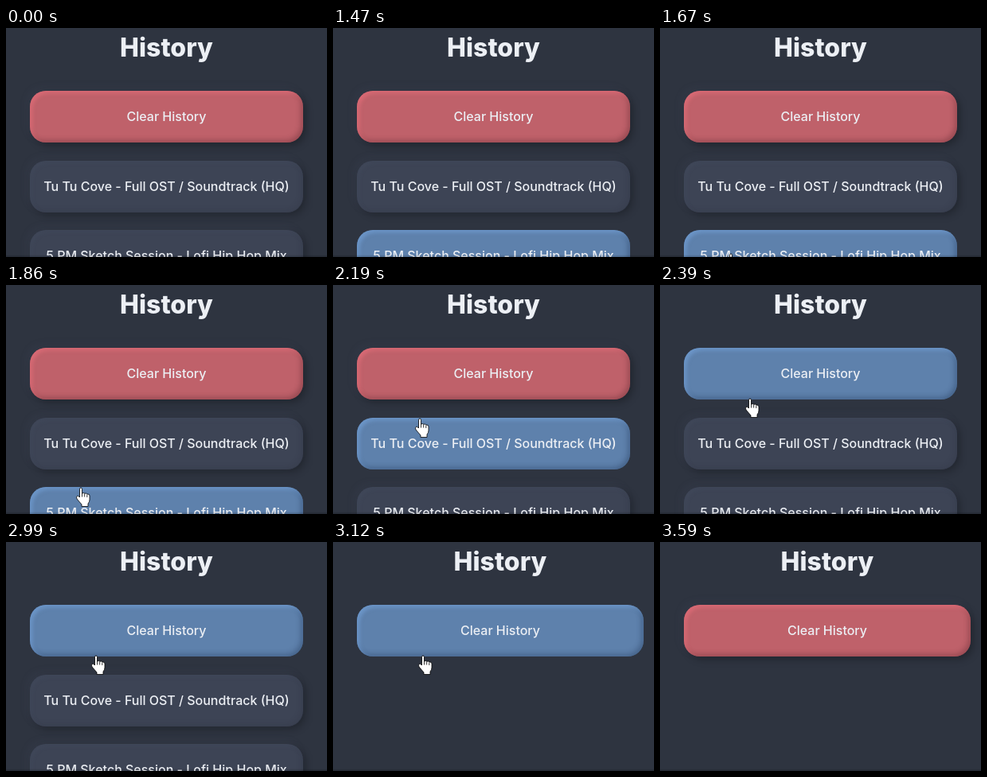
Recreate the animation shown at these times as an HTML page. Size 403 by 288 pixels, loop 4.52 s.

```html
<!DOCTYPE html>
<html lang="en">
<head>
<meta charset="utf-8">
<title>History</title>
<style>
  :root {
    --red: #bf616a;
    --blue: #5e81ac;
    --gray: #3d4455;
    --raised-red: 4px 4px 10px rgba(0, 0, 0, .25), -4px -4px 10px rgba(76, 86, 106, .14),
      inset 3px 3px 5px rgba(255, 120, 132, .45), inset -3px -3px 6px rgba(60, 20, 28, .28);
    --raised-gray: 4px 4px 10px rgba(0, 0, 0, .22), -4px -4px 10px rgba(76, 86, 106, .14),
      inset 3px 3px 5px rgba(76, 86, 106, .2), inset -3px -3px 6px rgba(30, 34, 44, .1);
    --flat: 0 0 0 rgba(0, 0, 0, 0), 0 0 0 rgba(0, 0, 0, 0),
      inset 3px 3px 5px rgba(125, 175, 235, .5), inset -3px -3px 6px rgba(25, 45, 75, .32);
  }
  html, body {
    margin: 0;
    width: 100%;
    height: 100%;
    overflow: hidden;
    background: #2e3440;
  }
  .stage {
    position: relative;
    width: 403px;
    height: 288px;
    overflow: hidden;
    background: #2e3440;
    color: #eceff4;
    font: 500 16px/65px Inter, "Open Sans", sans-serif;
  }
  .stage::after {
    content: "";
    position: absolute;
    inset: auto 0 0;
    height: 3px;
    background: linear-gradient(transparent, rgba(0, 0, 0, .2));
  }
  .page {
    position: absolute;
    left: 30px;
    width: 343px;
    text-align: center;
    white-space: nowrap;
    animation: widen 4520ms step-end infinite;
  }
  h1 {
    position: absolute;
    top: 0;
    width: 100%;
    margin: 0;
    font-size: 32px;
    font-weight: 800;
    line-height: 49px;
  }
  .button {
    position: absolute;
    width: 100%;
    height: 65px;
    border-radius: 20px;
    animation: 4520ms linear infinite;
  }
  .clear { top: 79px; animation-name: clear; }
  .first { top: 167px; animation-name: first; }
  .second { top: 254px; animation-name: second; }
  .list { animation: empty 4520ms step-end infinite; }
  .hand {
    position: absolute;
    left: 0;
    top: 0;
    animation: move 4520ms step-end infinite;
  }

  @keyframes widen {
    0% { width: 343px; }
    69.027%, 100% { width: 360px; }
  }
  @keyframes empty {
    0% { visibility: visible; }
    69.027%, 100% { visibility: hidden; }
  }
  @keyframes clear {
    0%, 79.425%, 100% { background-color: var(--red); box-shadow: var(--raised-red); }
    49.934% {
      background-color: var(--red);
      box-shadow: var(--raised-red);
      animation-timing-function: steps(2);
    }
    52.876% { background-color: var(--blue); box-shadow: var(--flat); }
    75.111% {
      background-color: var(--blue);
      box-shadow: var(--flat);
      animation-timing-function: steps(3);
    }
  }
  @keyframes first {
    0%, 51.4%, 100% { background-color: var(--gray); box-shadow: var(--raised-gray); }
    41.261% {
      background-color: var(--gray);
      box-shadow: var(--raised-gray);
      animation-timing-function: steps(2);
    }
    44.137% { background-color: var(--blue); box-shadow: var(--flat); }
    48.451% {
      background-color: var(--blue);
      box-shadow: var(--flat);
      animation-timing-function: steps(2);
    }
  }
  @keyframes second {
    0% {
      background-color: var(--gray);
      box-shadow: var(--raised-gray);
      animation-timing-function: step-end;
    }
    32.522% { background-color: var(--blue); box-shadow: var(--flat); }
    39.823% {
      background-color: var(--blue);
      box-shadow: var(--flat);
      animation-timing-function: steps(2);
    }
    42.699%, 100% { background-color: var(--gray); box-shadow: var(--raised-gray); }
  }
  @keyframes move {
    0% { transform: translate(80px, 300px); }
    36.947% { transform: translate(83px, 283px); animation-timing-function: steps(8); }
    48.451% { transform: translate(103px, 167px); animation-timing-function: steps(3); }
    52.876% { transform: translate(107px, 142px); }
    76.549% { transform: translate(106px, 177px); }
    77.987% { transform: translate(104px, 245px); }
    79.425%, 100% { transform: translate(100px, 300px); }
  }
</style>
</head>
<body>
<div class="stage">
  <div class="page">
    <h1>History</h1>
    <div class="button clear">Clear History</div>
    <div class="list">
      <div class="button first">Tu Tu Cove - Full OST / Soundtrack (HQ)</div>
      <div class="button second">5 PM Sketch Session - Lofi Hip Hop Mix</div>
    </div>
  </div>
  <svg class="hand" width="19" height="26" viewBox="0 0 19 26">
    <path fill="#fff" stroke="#000" stroke-width=".8" stroke-linejoin="round"
      d="M4.500 13V2.500Q4.500 1 6 1T7.500 2.500V8Q9.500 6.800 11 8.300Q12.500 7.400 14 9Q17 8.500 17 11V16Q17 18.500 15 21V24.500H7V22L1 15Q-.1 12.500 1.300 11.500T4 12.500Z"/>
    <path fill="none" stroke="#000" stroke-width=".8" d="M7.500 8V12.500M10.700 8.500V12.500M13.800 9.500V13"/>
  </svg>
</div>
</body>
</html>
```
